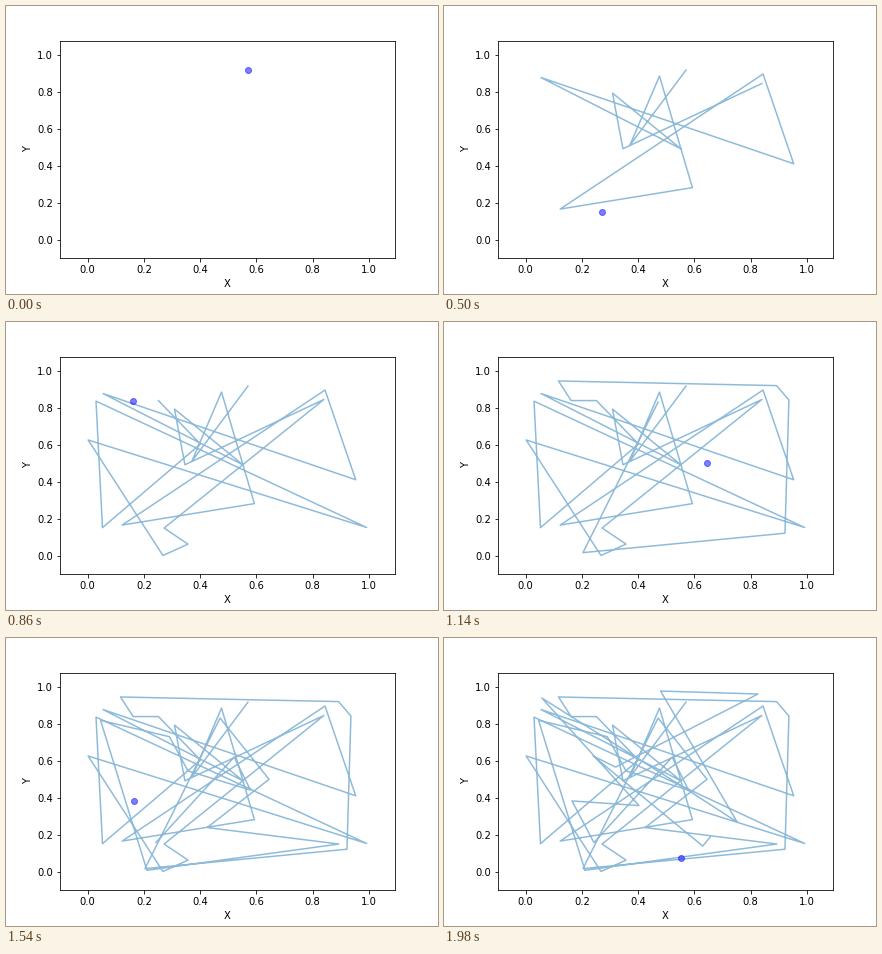
A matplotlib script for the animation above (2000 ms loop, 432 px wide and 288 px high).

```python
import numpy as np
import matplotlib.pyplot as plt
from matplotlib.animation import FuncAnimation

TICK = 20      # ms per animation frame
TICKS = 100    # one 2000 ms loop
PAD = 0.1      # room around the walk

# stops of the random walk
walk = np.array([
    (.570, .918), (.371, .513), (.476, .886), (.593, .283), (.123, .167),
    (.844, .897), (.953, .412), (.055, .878), (.552, .493), (.309, .794),
    (.346, .493), (.840, .846), (.272, .151), (.357, .064), (.268, .0025),
    (.002, .627), (.992, .154), (.030, .837), (.053, .153), (.401, .605),
    (.252, .840), (.162, .840), (.117, .946), (.892, .921), (.936, .843),
    (.922, .123), (.204, .018), (.471, .832), (.645, .501), (.425, .240),
    (.893, .151), (.211, .009), (.046, .820), (.291, .731), (.357, .546),
    (.579, .443), (.521, .621), (.243, .159), (.165, .384), (.403, .359),
    (.058, .940), (.549, .470), (.752, .270), (.480, .978), (.826, .962),
    (.320, .567), (.240, .627), (.630, .140), (.656, .189), (.553, .073),
])

plt.rcParams.update({"font.family": "DejaVu Sans", "font.size": 10})
fig, ax = plt.subplots(figsize=(6, 4), dpi=72, facecolor="white")
fig.subplots_adjust(left=0.125, right=0.9, bottom=0.125, top=0.88)

low, high = walk.min(axis=0) - PAD, walk.max(axis=0) + PAD
ax.set(xlim=(low[0], high[0]), ylim=(low[1], high[1]), xlabel="X", ylabel="Y")
ticks = np.arange(0, 1.1, 0.2)
ax.set_xticks(ticks)
ax.set_yticks(ticks)

trail, = ax.plot([], [], color="C0", lw=1.5, alpha=0.5)
dot, = ax.plot([], [], "bo", ms=6, alpha=0.5)


def update(tick):
    # a new stop every second tick, the first one held a tick longer
    step = max(0, (tick - 1) // 2)
    trail.set_data(*walk[:step].T)
    dot.set_data(*walk[step:step + 1].T)
    return trail, dot


anim = FuncAnimation(fig, update, frames=TICKS, interval=TICK,
                     repeat=True, repeat_delay=0)
plt.show()
```
